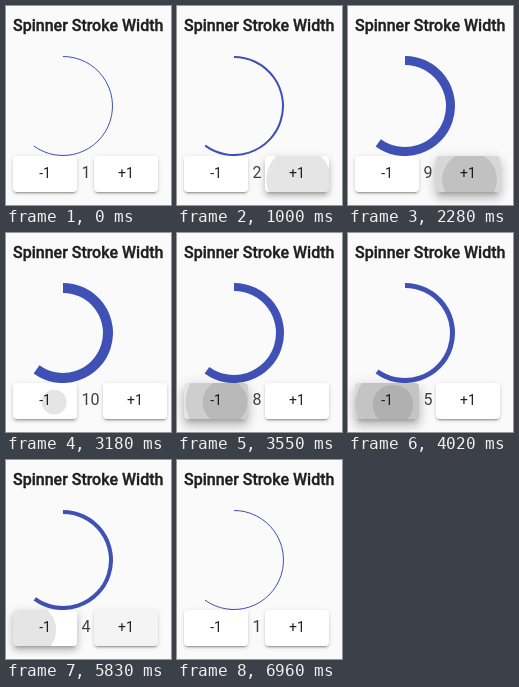
Recreate the animation shown at these times as an HTML page. Size 165 by 199 pixels, loop 7650 ms.

```html
<!DOCTYPE html>
<html lang="en">
<head>
<meta charset="utf-8">
<title>Spinner Stroke Width</title>
<style>
  html, body { margin: 0; width: 100%; height: 100%; overflow: hidden; background: #fafafa; }
  body { position: relative; font: 16px Roboto, sans-serif; color: rgba(0, 0, 0, .87); }
  h3, svg, .value, .btn { position: absolute; margin: 0; white-space: nowrap; }
  h3 {
    left: 7px; top: 8px; font-size: 16px; font-weight: 500; line-height: 24px;
    -webkit-text-stroke: .35px;
  }
  svg { left: 6.5px; top: 50px; }
  .value { left: 75.5px; top: 155px; line-height: 24px; color: rgba(0, 0, 0, .75); }
  .btn {
    top: 150px; width: 64px; height: 36px; border-radius: 4px; background: #fff;
    font-size: 14px; line-height: 34px; text-align: center;
  }
  #minus { left: 7px; }
  .clip { position: absolute; inset: 0; overflow: hidden; border-radius: inherit; }
  .ripple { position: absolute; border-radius: 50%; background: rgba(0, 0, 0, .1); }
</style>
</head>
<body>
<h3>Spinner Stroke Width</h3>
<svg width="100" height="100"><path id="arc" fill="none" stroke="#3f51b5"/></svg>
<div class="btn" id="minus">-1<div class="clip"></div></div>
<div class="value" id="value">1</div>
<div class="btn" id="plus">+1<div class="clip"></div></div>
<script>
const LOOP = 7650, HOLD = 110, ENTER = 450, FADE = 400, LIFT = 280;
const W = 64, H = 36;
const $ = id => document.getElementById(id);

// Runs of clicks: button, pointer position inside it, first press, interval, count
const runs = [
  ['plus', 34, 24, 810, 190, 9],
  ['minus', 41, 19, 3141, 160, 4],
  ['minus', 38, 22, 3781, 160, 5],
  ['plus', 34, 24, 4925, 175, 3],
  ['minus', 16, 20, 5735, 187, 3]
];
const presses = runs.flatMap(([id, x, y, first, gap, count]) =>
  Array.from({ length: count }, (_, i) => ({ id, x, y, at: first + i * gap })));

for (const p of presses) {
  const r = Math.hypot(Math.max(p.x, W - p.x), Math.max(p.y, H - p.y));
  p.el = document.createElement('div');
  p.el.className = 'ripple';
  p.el.style.cssText = `left:${p.x - r}px;top:${p.y - r}px;width:${2 * r}px;height:${2 * r}px`;
  $(p.id).querySelector('.clip').append(p.el);
}

// Cubic bezier easing with end heights 0 and 1
function bezier(x1, x2) {
  return x => {
    if (x <= 0) return 0;
    if (x >= 1) return 1;
    let lo = 0, hi = 1, s;
    for (let i = 0; i < 24; i++) {
      s = (lo + hi) / 2;
      const bx = 3 * (1 - s) * (1 - s) * s * x1 + 3 * (1 - s) * s * s * x2 + s * s * s;
      if (bx < x) lo = s; else hi = s;
    }
    return 3 * (1 - s) * s * s + s * s * s;
  };
}
const decel = bezier(0, .2), standard = bezier(.4, .2);

// Elevation 0..1: each press or release restarts the transition
function lift(id, t) {
  let from = 0, to = 0, start = 0;
  const now = time => from + (to - from) * standard((time - start) / LIFT);
  const turn = (time, target) => {
    if (time > t) return;
    from = now(time);
    to = target;
    start = time;
  };
  for (const p of presses) {
    if (p.id !== id) continue;
    turn(p.at, 1);
    turn(p.at + HOLD, 0);
  }
  return now(t);
}

function shadow(k) {
  const mix = (a, b) => (a + (b - a) * k).toFixed(2) + 'px';
  const layer = (y, blur, spread, alpha) =>
    `0 ${mix(...y)} ${mix(...blur)} ${mix(...spread)} rgba(0,0,0,${alpha})`;
  return [
    layer([3, 5], [1, 5], [-2, -3], .2),
    layer([2, 8], [2, 10], [0, 1], .14),
    layer([1, 3], [5, 14], [0, 2], .12)
  ].join();
}

function drawArc(width) {
  const r = 50 - width / 2, a = .6 * 2 * Math.PI;
  const x = 50 + r * Math.sin(a), y = 50 - r * Math.cos(a);
  $('arc').setAttribute('d', `M50 ${50 - r}A${r} ${r} 0 1 1 ${x} ${y}`);
  $('arc').setAttribute('stroke-width', width);
}

function render(t) {
  let value = 1;
  for (const p of presses) {
    const age = t - p.at;
    if (age >= HOLD) value += p.id === 'plus' ? 1 : -1;
    p.el.style.transform = `scale(${decel(age / ENTER)})`;
    p.el.style.opacity = age < 0 ? 0 : 1 - decel((age - ENTER) / FADE);
  }
  $('value').textContent = value;
  $('plus').style.left = (value > 9 ? 97 : 88) + 'px';
  for (const id of ['minus', 'plus']) $(id).style.boxShadow = shadow(lift(id, t));
  drawArc(value);
}

const begin = performance.now();
function tick() {
  render((performance.now() - begin) % LOOP);
  requestAnimationFrame(tick);
}
tick();
</script>
</body>
</html>
```
